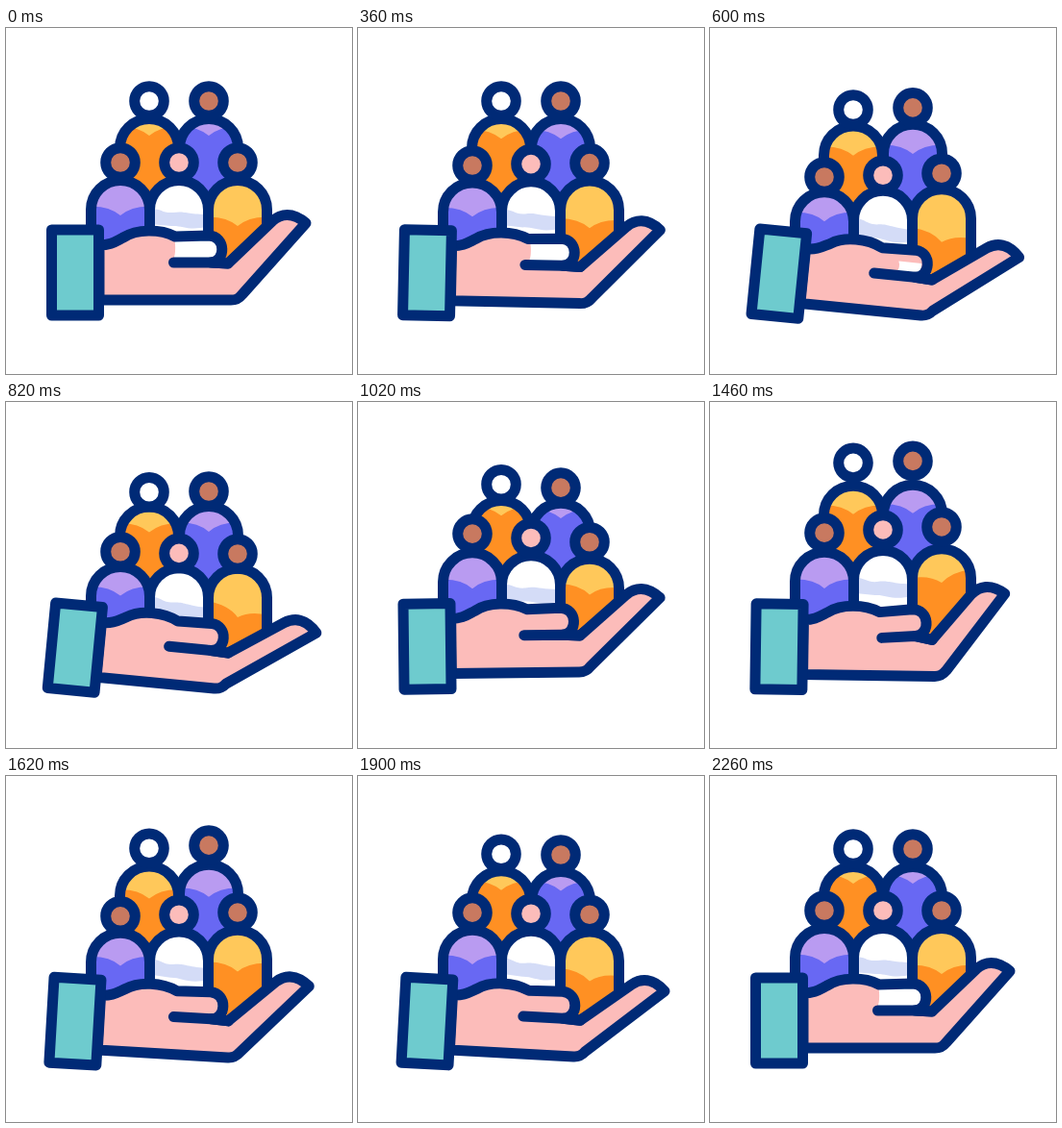
These frames come from a looping animation (360x360 px, 2400 ms). An HTML page with a canvas:

```html
<!DOCTYPE html>
<html lang="en">
<head>
<meta charset="utf-8">
<title>People in a caring hand</title>
<style>
html, body { margin: 0; width: 100%; height: 100%; overflow: hidden; background: #fff; }
canvas { display: block; width: 360px; height: 360px; }
</style>
</head>
<body>
<canvas id="stage"></canvas>
<script>
const LOOP = 2400, START = 220;
const NAVY = '#002a76', TEAL = '#6ecbce', PINK = '#fcbcba', BROWN = '#c87960';
const ORANGE = ['#ffc85a', '#ff9023'], VIOLET = ['#b99bf1', '#6868f3'], WHITE = ['#fff', '#d4dcf7'];

const canvas = document.getElementById('stage');
const ctx = canvas.getContext('2d');
const dpr = window.devicePixelRatio || 1;
canvas.width = canvas.height = 360 * dpr;

// Leaves the rest value at START, swings through the turning points, is back at rest at end.
function swing(rest, end, ...turns) {
  const keys = [[START, rest], ...turns, [end, rest]];
  return t => {
    const i = keys.findIndex(k => t < k[0]);
    if (i < 1) return rest;
    const [t0, a] = keys[i - 1], [t1, b] = keys[i];
    return a + (b - a) * (1 - Math.cos(Math.PI * (t - t0) / (t1 - t0))) / 2;
  };
}

const bounce = swing(0, 2050, [740, 18], [1230, -16], [1670, 6.5]);
const tilt = swing(0, 2250, [720, 6.6], [1160, -2.8], [1740, 4]);
const flex = swing(0, 2250, [780, 9], [1340, -7.3], [1820, 5.5]);
const backNeck = swing(12, 2000, [660, 26], [1100, 9], [1620, 28]);
const rightNeck = swing(42, 2250, [660, 50], [1230, 24], [1900, 46]);
const shine = swing(1, 2250, [940, 0], [2050, 0]);

const people = [
  { x: 149, y: 76, lag: 120, skin: '#fff', cloth: ORANGE, neck: backNeck },
  { x: 211, y: 76, lag: 160, skin: BROWN, cloth: VIOLET, neck: backNeck },
  { x: 119, y: 140, lag: 0, skin: BROWN, cloth: VIOLET, neck: (t, shift) => 31 - shift / 2 },
  { x: 180, y: 140, lag: 40, skin: PINK, cloth: WHITE, sway: tilt },
  { x: 241, y: 140, lag: 80, skin: BROWN, cloth: ORANGE, neck: rightNeck, sway: t => 1.5 * flex(t) }
];

const rad = deg => deg * Math.PI / 180;

function turn([x, y], [cx, cy], deg) {
  const c = Math.cos(rad(deg)), s = Math.sin(rad(deg));
  return [cx + (x - cx) * c - (y - cy) * s, cy + (x - cx) * s + (y - cy) * c];
}

function paint(path, fill) {
  ctx.fillStyle = fill;
  ctx.fill(path);
  ctx.stroke(path);
}

// Drawn around the dip of the neckline, or the middle of the white shirt's fold.
function drawCloth(p, top, shift, t) {
  const c = new Path2D();
  ctx.translate(p.x, p.neck ? top + p.neck(t, shift) : 188 + 1.2 * shift);
  if (p.sway) ctx.rotate(rad(p.sway(t)));
  if (p.neck) {
    c.moveTo(-36, -9);
    c.quadraticCurveTo(-13, -11, 0, 0);
    c.quadraticCurveTo(13, -11, 36, -9);
    c.lineTo(36, 100);
    c.lineTo(-36, 100);
  } else {
    c.moveTo(-32, 0);
    c.bezierCurveTo(-18, -1, -18, 5, -6, 4);
    c.bezierCurveTo(6, 2, 8, 6, 32, 6);
    c.lineTo(32, 18);
    c.bezierCurveTo(10, 24, 4, 17, -8, 18);
    c.lineTo(-32, 16);
  }
  ctx.fillStyle = p.cloth[1];
  ctx.fill(c);
}

function drawPerson(p, t, [left, right, corner]) {
  const b = bounce(t - p.lag), r = 30.5;
  const shift = b * (b < 0 ? 0.57 : 0.82);
  const top = p.y + 24 + shift;
  const body = new Path2D();
  body.moveTo(p.x - r, left);
  body.arc(p.x, top + 25, r, Math.PI, 0);
  body.lineTo(p.x + r, right);
  if (corner) body.lineTo(...corner);
  ctx.fillStyle = p.cloth[0];
  ctx.fill(body);
  ctx.save();
  ctx.clip(body);
  drawCloth(p, top, shift, t);
  ctx.restore();
  ctx.stroke(body);

  const head = new Path2D();
  head.arc(p.x, p.y + b, 15.3, 0, Math.PI * 2);
  paint(head, p.skin);
}

function drawHand(at, tip, bend, white) {
  const h = new Path2D();
  const line = a => h.lineTo(...a);
  const arc = (a, b, c) => h.bezierCurveTo(...a, ...b, ...c);
  // The thumb lifts as the fingers curl up; the heel slides back as they open.
  const thumb = (x, y) => at(...turn([x, y], [174, 230], Math.min(bend, 0) * 0.7));
  const heel = 1.6 * Math.max(bend, 0);
  const groove = thumb(174.5 - 0.6 * bend, 244);

  h.moveTo(...at(97, 226));
  arc(at(109, 226), at(114, 222), at(122, 218));
  arc(at(136, 209), at(160, 209), at(176, 217));
  line(thumb(211, 216));
  arc(thumb(229, 217), thumb(229, 243), thumb(213, 244));
  line(at(231, 245));
  line(tip(277, 201));
  arc(tip(286, 193), tip(298, 191), tip(312, 203));
  line(at(246 - heel, 277));
  arc(at(242 - heel, 282), at(239 - heel, 283), at(234 - heel, 283));
  line(at(97, 283));
  h.closePath();
  ctx.fillStyle = PINK;
  ctx.fill(h);

  if (white > 0) {
    const w = new Path2D(), x = 212 - 36 * white, y = 240 - 24 * white, end = 212 + 14 * white;
    w.moveTo(...at(x - 1, y));
    w.lineTo(...at(end, y));
    w.lineTo(...at(end, 242));
    w.lineTo(...at(x - 3, 242));
    w.quadraticCurveTo(...at(x + 2, 236), ...at(x - 1, y));
    ctx.save();
    ctx.clip(h);
    ctx.fillStyle = '#fff';
    ctx.fill(w);
    ctx.restore();
  }
  ctx.stroke(h);

  const crease = new Path2D();
  crease.moveTo(...groove);
  crease.lineTo(...thumb(213, 244));
  crease.lineTo(...at(231, 245));
  ctx.stroke(crease);

  const sleeve = new Path2D();
  sleeve.moveTo(...at(47.5, 210));
  sleeve.lineTo(...at(96.5, 210));
  sleeve.lineTo(...at(96.5, 299));
  sleeve.lineTo(...at(47.5, 299));
  sleeve.closePath();
  paint(sleeve, TEAL);
}

function draw(t) {
  ctx.setTransform(dpr, 0, 0, dpr, 0, 0);
  ctx.fillStyle = '#fff';
  ctx.fillRect(0, 0, 360, 360);
  ctx.strokeStyle = NAVY;
  ctx.lineWidth = 11;
  ctx.lineJoin = ctx.lineCap = 'round';

  const lean = tilt(t), bend = flex(t);
  const at = (x, y) => turn([x, y + 0.2 * lean], [72, 254], lean);
  const tip = (x, y) => turn(at(x, y), at(235, 264), bend);

  // The right body rests on the crease and the raised fingers.
  const crease = at(231, 245), finger = tip(277, 201);
  const rise = (finger[1] - crease[1]) / (finger[0] - crease[0]);
  const rest = crease[1] + rise * (271.5 - crease[0]) + 3;
  const flat = at(180, 232)[1];

  people.forEach((p, i) => {
    const floor = i < 2 ? [200, 200]
      : i < 4 ? [flat, flat]
      : [at(211, 237)[1], rest, crease];
    drawPerson(p, t, floor);
  });
  drawHand(at, tip, bend, shine(t));
}

const start = performance.now();
function tick() {
  draw((performance.now() - start) % LOOP);
  requestAnimationFrame(tick);
}
tick();
</script>
</body>
</html>
```
